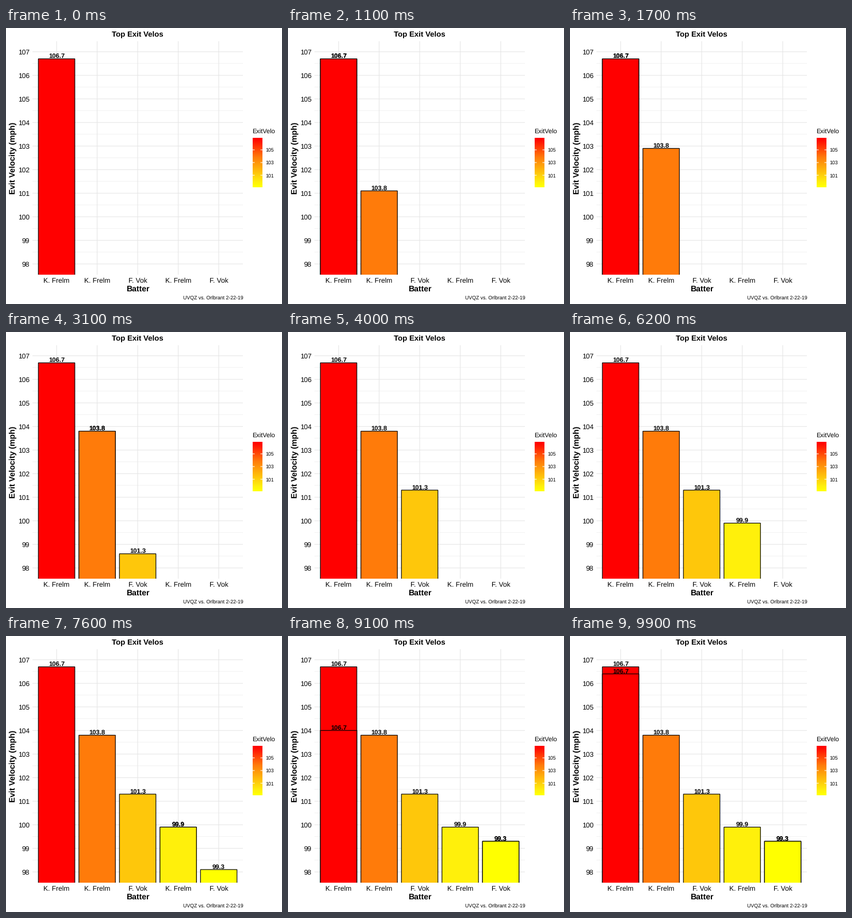
These frames come from a looping animation (480 by 480 pixels, 10 s). A matplotlib script:

```python
import matplotlib.pyplot as plt
import numpy as np
from matplotlib.animation import FuncAnimation
from matplotlib.colors import LinearSegmentedColormap
from matplotlib.patches import Rectangle

SIZE, DPI = 480, 80
FRAMES, INTERVAL = 100, 100
SPAN, HOLD = 20, 10            # frames per state, frames at rest
DRIFT = 3                      # how far below its mark a bar enters
WIDTH = 0.9

BATTERS = ["K. Frelm", "K. Frelm", "F. Vok", "K. Frelm", "F. Vok"]
VELOS = [106.7, 103.8, 101.3, 99.9, 99.3]
LOW, HIGH = min(VELOS), max(VELOS)
HEAT = LinearSegmentedColormap.from_list("heat", [
    (0, "#ffff00"), (0.081, "#fff00b"), (0.27, "#fec70b"),
    (0.608, "#ff7b0a"), (1, "#ff0000")])

plt.rcParams.update({
    "font.family": "Liberation Sans",
    "text.hinting": "none",
    "toolbar": "None",
})


def pt(px):
    return px * 72 / DPI


def heat(velo):
    return HEAT((velo - LOW) / (HIGH - LOW))


fig = plt.figure(figsize=(SIZE / DPI, SIZE / DPI), dpi=DPI, facecolor="white")


def add_panel(left, top, right, bottom):
    ax = fig.add_axes([left / SIZE, 1 - bottom / SIZE,
                       (right - left) / SIZE, (bottom - top) / SIZE])
    ax.set_axis_off()
    return ax


def write(x, y, text, size, **kw):
    kw.setdefault("va", "baseline")
    return fig.text(x / SIZE, 1 - y / SIZE, text, fontsize=pt(size), **kw)


# Panel and grid
LEFT, TOP, RIGHT, BOTTOM = 45.7, 22.85, 412.3, 428.75
UNIT, STEP = 41, 70.5
ax = add_panel(LEFT, TOP, RIGHT, BOTTOM)
ax.set_xlim(0.4, 5.6)
ax.set_ylim(97.55, 107.45)
for n in range(98, 108):
    ax.axhline(n, color="#e6e6e6", lw=pt(1.07), snap=False, zorder=0)
    if n < 107:
        ax.axhline(n + 0.5, color="#ebebeb", lw=pt(0.6), snap=False, zorder=0)
    write(41.2, 41.3 + (107 - n) * UNIT + 4.3, str(n), 12, ha="right")
for n, name in enumerate(BATTERS):
    ax.axvline(n + 1, color="#e6e6e6", lw=pt(1.07), snap=False, zorder=0)
    write(88 + n * STEP, 443, name, 12, ha="center")

# Titles
write(229, 15.2, "Top Exit Velos", 13.2, weight="bold", ha="center")
write(229, 458, "Batter", 14, weight="bold", ha="center")
write(15.5, 226, "Evit Velocity (mph)", 14, weight="bold", rotation=90,
      ha="right", va="center").set(x=18.6 / SIZE)
write(412.2, 472.2, "UVQZ vs. Orlbrant 2-22-19", 8.8, ha="right")

# Colour key
BINS = 20
key = add_panel(429, 191, 446, 277)
key.imshow(np.linspace(0, 1, BINS)[:, None], cmap=HEAT, origin="lower",
           aspect="auto", extent=(0, 1, 0, 1), interpolation="bilinear")
write(428.4, 184.2, "ExitVelo", 11)
for velo in (101, 103, 105):
    pos = (0.5 + (velo - LOW) / (HIGH - LOW) * (BINS - 1)) / BINS
    for a, b in ((0, 0.2), (0.8, 1)):
        key.plot([a, b], [pos, pos], color="white", lw=pt(1.07), snap=False,
                 solid_capstyle="butt")
    write(451.2, 277 - 86 * pos + 3.4, str(velo), 8.8)
key.set(xlim=(0, 1), ylim=(0, 1))


class Bar:
    """A column with its value written on top."""

    def __init__(self):
        self.box = ax.add_patch(Rectangle(
            (0, 0), WIDTH, 1, ec="black", lw=pt(1.15), snap=False, zorder=2))
        self.label = ax.text(0, 0, "", fontsize=pt(11.3), weight="bold",
                             ha="center", va="baseline", clip_on=True,
                             zorder=3)

    def show(self, n, top):
        self.box.set(x=n + 1 - WIDTH / 2, height=top, facecolor=heat(VELOS[n]))
        self.label.set(x=n + 1, y=top + 1.4 / UNIT, text=str(VELOS[n]))
        self.set_visible(True)

    def set_visible(self, on):
        self.box.set_visible(on)
        self.label.set_visible(on)


settled = [Bar() for _ in VELOS]
leaving, entering = Bar(), Bar()
for n, bar in enumerate(settled):
    bar.show(n, VELOS[n])


def update(i):
    state, step = divmod(i, SPAN)
    for n, bar in enumerate(settled):
        bar.set_visible(n <= state)
    if step > HOLD:
        new = (state + 1) % len(VELOS)
        progress = (step - HOLD) / (SPAN - HOLD)
        leaving.show(state, VELOS[state])
        entering.show(new, VELOS[new] - DRIFT * (1 - progress))
    else:
        leaving.set_visible(False)
        entering.set_visible(False)
    return []


anim = FuncAnimation(fig, update, frames=FRAMES, interval=INTERVAL,
                     init_func=lambda: update(0), repeat=True, repeat_delay=0,
                     blit=False)
plt.show()
```
